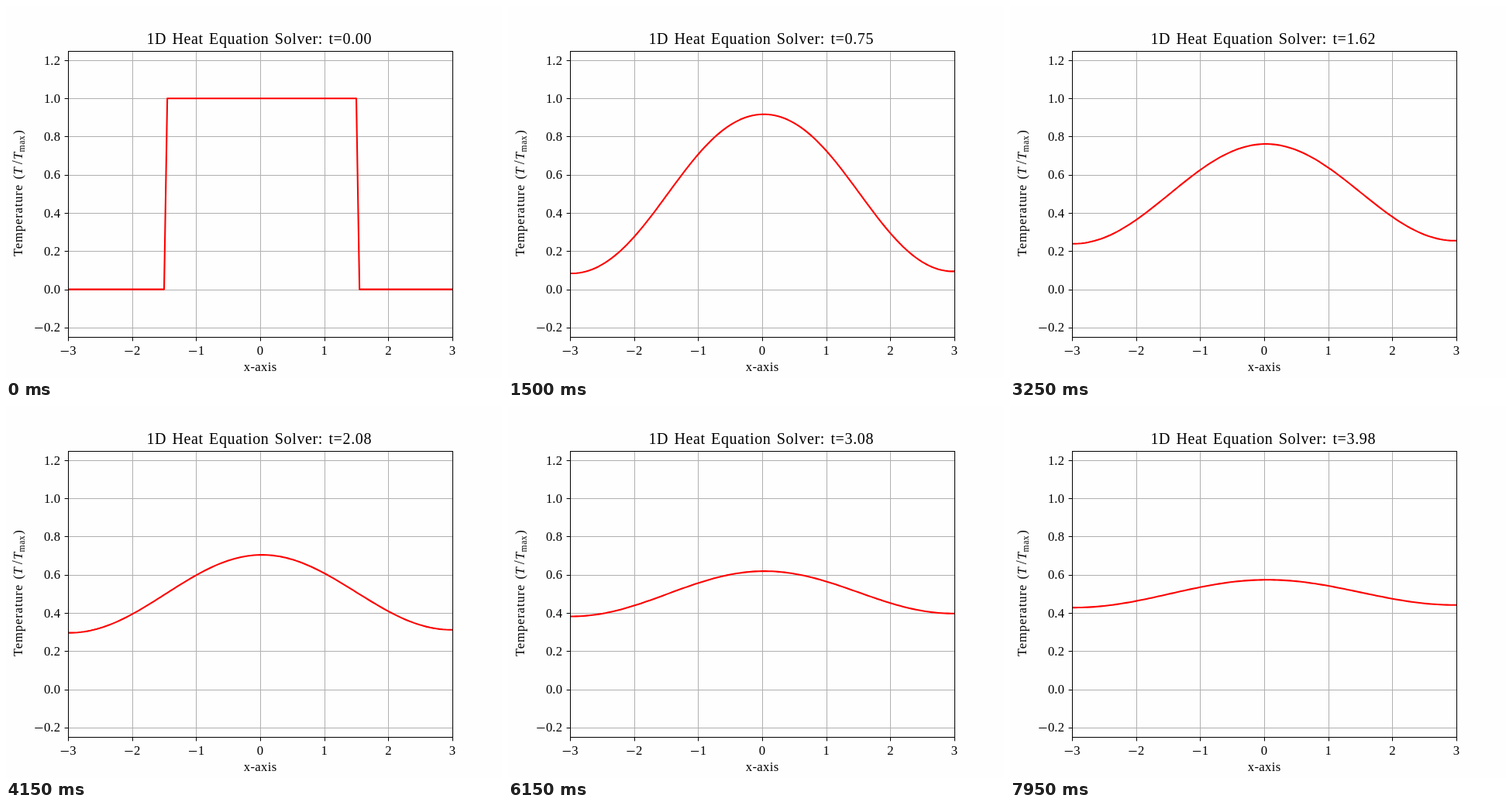
Write an HTML page with a canvas that moves like this. It is 640x480 px and loops after 8000 ms.

```html
<!DOCTYPE html>
<html lang="en">
<head>
<meta charset="utf-8">
<title>1D Heat Equation Solver</title>
<style>
  html, body { margin: 0; width: 100%; height: 100%; overflow: hidden; background: #fefefe; }
  canvas { display: block; width: 640px; height: 480px; }
</style>
</head>
<body>
<canvas id="plot" width="640" height="480"></canvas>
<script>
const ctx = document.getElementById('plot').getContext('2d');

const FRAME_MS = 50, FRAMES = 160, FRAME_DT = 0.025;
const BOX = { left: 80, right: 576, top: 57.6, bottom: 427.2 };
const FAMILY = '"Liberation Serif", "Times New Roman", serif';
const SIZE = 16.67;

const px = x => BOX.left + (x + 3) / 6 * (BOX.right - BOX.left);
const py = y => BOX.bottom - (y + 0.25) / 1.5 * (BOX.bottom - BOX.top);
const snap = v => Math.round(v) + 0.5;

// Explicit finite differences with insulated ends.
const N = 121, DX = 0.05, ALPHA = 0.5, SUBSTEPS = 20;
const RATIO = ALPHA * (FRAME_DT / SUBSTEPS) / (DX * DX);

function diffuse(u) {
  const next = u.slice();
  for (let i = 1; i < N - 1; i++) {
    next[i] = u[i] + RATIO * (u[i - 1] - 2 * u[i] + u[i + 1]);
  }
  next[0] = next[1];
  next[N - 1] = next[N - 2];
  return next;
}

function solve() {
  let u = Array.from({ length: N }, (_, i) => (i > 30 && i <= 90 ? 1 : 0));
  const states = [];
  for (let f = 0; f < FRAMES; f++) {
    states.push(u);
    for (let s = 0; s < SUBSTEPS; s++) u = diffuse(u);
  }
  return states;
}

const states = solve();

function line(x1, y1, x2, y2, color) {
  ctx.strokeStyle = color;
  ctx.lineWidth = 1;
  ctx.beginPath();
  ctx.moveTo(x1, y1);
  ctx.lineTo(x2, y2);
  ctx.stroke();
}

function text(str, x, y, { size = SIZE, style = '', spacing = 0, words = 0 } = {}) {
  ctx.font = `${style} ${size}px ${FAMILY}`;
  ctx.letterSpacing = spacing + 'px';
  ctx.wordSpacing = words + 'px';
  ctx.fillStyle = '#000';
  ctx.fillText(str, x, y);
}

// Number label with a wide, thin minus sign; x is its right edge.
function numberLabel(value, digits, x, baseline) {
  const str = Math.abs(value).toFixed(digits);
  const width = (str.length > 1 ? 1.278 : 0.5) * SIZE;
  text(str, x - width, baseline, { spacing: digits ? 0.15 : 0 });
  if (value < 0) {
    const y = Math.round(baseline - 5) + 0.5;
    line(x - width - 11.6, y, x - width - 1.4, y, '#000');
  }
}

const X_TICKS = [-3, -2, -1, 0, 1, 2, 3];
const Y_TICKS = [-1, 0, 1, 2, 3, 4, 5, 6].map(k => k / 5);

function drawGrid() {
  const top = snap(BOX.top), bottom = snap(BOX.bottom);
  const left = snap(BOX.left), right = snap(BOX.right);
  for (const x of X_TICKS) line(snap(px(x)), top, snap(px(x)), bottom, '#b0b0b0');
  for (const y of Y_TICKS) line(left, snap(py(y)), right, snap(py(y)), '#b0b0b0');
}

function drawCurve(u) {
  ctx.save();
  ctx.beginPath();
  ctx.rect(BOX.left, BOX.top, BOX.right - BOX.left, BOX.bottom - BOX.top);
  ctx.clip();
  ctx.beginPath();
  u.forEach((v, i) => ctx.lineTo(px(-3 + i * DX), py(v)));
  ctx.strokeStyle = '#f00';
  ctx.lineWidth = 2.083;
  ctx.lineJoin = 'round';
  ctx.lineCap = 'square';
  ctx.stroke();
  ctx.restore();
}

function drawAxes() {
  const top = snap(BOX.top), bottom = snap(BOX.bottom);
  const left = snap(BOX.left), right = snap(BOX.right);
  ctx.strokeStyle = '#000';
  ctx.lineWidth = 1;
  ctx.strokeRect(left, top, right - left, bottom - top);
  for (const x of X_TICKS) {
    line(snap(px(x)), bottom, snap(px(x)), bottom + 4.86, '#000');
    const width = (x < 0 ? 1.278 : 0.5) * SIZE;
    numberLabel(x, 0, px(x) + width / 2, 450);
  }
  for (const y of Y_TICKS) {
    line(left - 4.86, snap(py(y)), left, snap(py(y)), '#000');
    numberLabel(y, 1, 70.2, py(y) + 5.6);
  }
}

function drawLabels() {
  text('x-axis', 306.8, 471, { spacing: 0.35 });
  ctx.save();
  ctx.translate(21, 323);
  ctx.rotate(-Math.PI / 2);
  text('Temperature', 0, 0, { spacing: 0.82 });
  text('(', 99.5, 0);
  text('T', 105.5, 0, { style: 'italic' });
  text('/', 118.8, 0, { size: 18 });
  text('T', 125, 0, { style: 'italic' });
  text('max', 134.6, 2.6, { size: 11.67, spacing: 0.5 });
  text(')', 157.2, 0);
  ctx.restore();
}

// Two decimals, exact halves rounded to even.
function formatTime(t) {
  return (t % 0.5 === 0.125 ? t - 1e-9 : t).toFixed(2);
}

function drawTitle(t) {
  text('1D Heat Equation Solver: t=' + formatTime(t), 181.4, 49,
    { size: 20, spacing: 0.64, words: 1.7 });
}

function render(now) {
  const frame = Math.floor(now / FRAME_MS) % FRAMES;
  ctx.fillStyle = '#fefefe';
  ctx.fillRect(0, 0, 640, 480);
  drawGrid();
  drawCurve(states[frame]);
  drawAxes();
  drawLabels();
  drawTitle(frame * FRAME_DT);
}

let start = null;
function tick(now) {
  if (start === null) start = now;
  render(Math.max(0, now - start));
  requestAnimationFrame(tick);
}
render(0);
requestAnimationFrame(tick);
</script>
</body>
</html>
```
